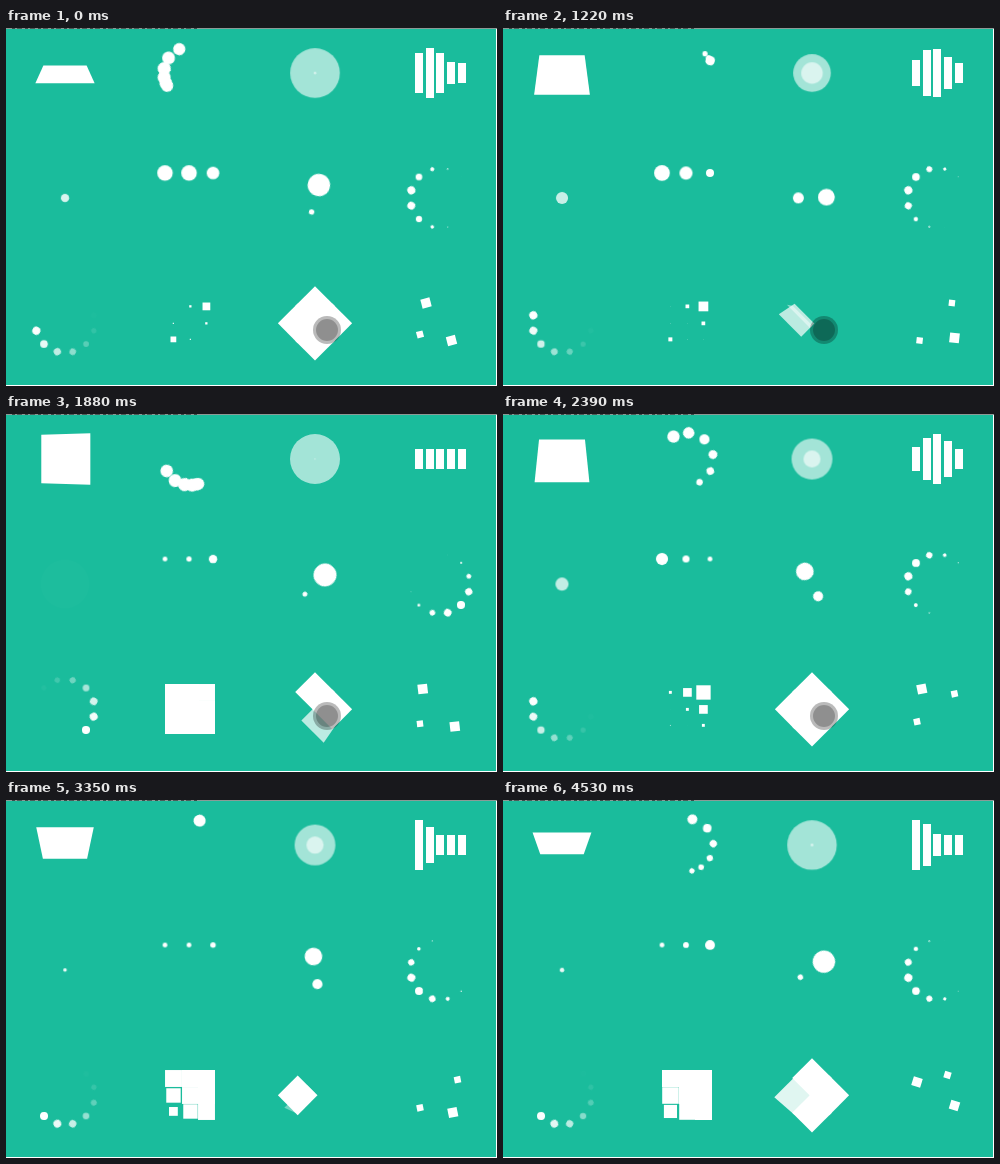
Animation of 491 by 358 pixels, one loop 4.55 s. Source, as an HTML page:

```html
<!DOCTYPE html>
<html lang="en">
<head>
<meta charset="utf-8">
<title>Loading spinners</title>
<style>
  html, body { margin: 0; width: 100%; height: 100%; overflow: hidden; background: #1abc9c; }
  * { animation-play-state: paused !important; }
  .spin { position: absolute; width: 50px; height: 50px; }
  i, b { display: block; position: absolute; }
  .chase b, .ring b, .fade b, .bounce i, .flow i, .swing i, .pulse { border-radius: 50%; }
  .plane, .pulse, .chase b, .ring b, .fade b, .fold b,
  .bounce i, .wave i, .flow i, .swing i, .grid i, .wander i { background: #fff; }

  .plane { animation: plane 1.2s ease-in-out infinite; }
  @keyframes plane {
    0% { transform: perspective(150px) rotateX(0deg) rotateY(0deg); }
    50% { transform: perspective(150px) rotateX(-180.1deg) rotateY(0deg); }
    100% { transform: perspective(150px) rotateX(-180deg) rotateY(-179.9deg); }
  }

  .chase { animation: chase-turn 2.5s linear infinite; }
  .chase i { inset: 0; animation: chase-dot 2s ease-in-out infinite; }
  .chase b { width: 25%; height: 25%; animation: chase-size 2s ease-in-out infinite; }
  .chase i, .chase b { animation-delay: calc(var(--n) * .1s - 1.1s); }
  @keyframes chase-turn { 100% { transform: rotate(360deg); } }
  @keyframes chase-dot { 80%, 100% { transform: rotate(360deg); } }
  @keyframes chase-size { 0%, 100% { transform: scale(1); } 50% { transform: scale(.4); } }

  .bounce i {
    inset: 0; opacity: .6; animation: bounce 2s cubic-bezier(.455, .03, .515, .955) infinite;
    animation-delay: calc(var(--n) * -1s);
  }
  @keyframes bounce { 0%, 100% { transform: scale(0); } 45%, 55% { transform: scale(1); } }

  .wave i {
    left: calc(var(--n) * 10.625px); width: 7.5px; height: 100%;
    animation: wave 1.2s ease-in-out infinite; animation-delay: calc(var(--n) * .1s - 1.2s);
  }
  @keyframes wave { 0%, 40%, 100% { transform: scaleY(.4); } 20% { transform: scaleY(1); } }

  .pulse { animation: pulse 1.2s cubic-bezier(.455, .03, .515, .955) infinite; }
  @keyframes pulse { 0% { transform: scale(0); } 100% { transform: scale(1); opacity: 0; } }

  .flow i {
    left: calc(var(--n) * 24px - 8px); top: -8px; width: 16px; height: 16px;
    animation: flow 1.4s cubic-bezier(.455, .03, .515, .955) infinite;
    animation-delay: calc(var(--n) * .15s - .3s);
  }
  @keyframes flow { 0%, 80%, 100% { transform: scale(.3); } 40% { transform: scale(1); } }

  .swing { animation: swing-turn 1.8s linear infinite; }
  .swing i {
    left: 13.75px; top: calc(var(--n) * 27.5px); width: 22.5px; height: 22.5px;
    animation: swing-size 2s ease-in-out infinite; animation-delay: calc(var(--n) * -1s);
  }
  @keyframes swing-turn { 100% { transform: rotate(360deg); } }
  @keyframes swing-size { 0%, 100% { transform: scale(.2); } 50% { transform: scale(1); } }

  .ring i, .fade i { inset: 0; transform: rotate(calc(var(--n) * 30deg + 30deg)); }
  .ring b, .fade b {
    width: 15%; height: 15%; animation: ring 1.2s ease-in-out infinite;
    animation-delay: calc(var(--n) * .1s - 1.1s);
  }
  .fade b { animation-name: fade; }
  @keyframes ring { 0%, 80%, 100% { transform: scale(0); } 40% { transform: scale(1); } }
  @keyframes fade {
    0%, 39%, 100% { opacity: 0; transform: scale(.6); }
    40% { opacity: 1; transform: scale(1); }
  }

  .grid { display: grid; grid-template: repeat(3, 1fr) / repeat(3, 1fr); }
  .grid i {
    position: static; animation: grid 1.3s ease-in-out infinite;
    animation-delay: calc(var(--diagonal) * .1s);
  }
  @keyframes grid { 0%, 70%, 100% { transform: scale(1); } 35% { transform: scale(0); } }

  .fold { transform: rotate(45deg); }
  .fold i {
    left: -1.25px; top: -1.25px; width: 27.5px; height: 27.5px;
    transform-origin: 26.25px 26.25px; transform: rotate(calc(var(--n) * 90deg));
  }
  .fold b {
    inset: 0; transform-origin: 100% 100%; animation: fold 2.4s linear infinite;
    animation-delay: calc(var(--n) * .3s);
  }
  @keyframes fold {
    0%, 10% { transform: perspective(192px) rotateX(-180deg); opacity: 0; }
    25%, 75% { transform: perspective(192px) rotateX(0deg); opacity: 1; }
    90%, 100% { transform: perspective(192px) rotateY(180deg); opacity: 0; }
  }

  .wander i {
    width: 20%; height: 20%; animation: wander 2s ease-in-out infinite;
    animation-delay: calc(var(--n) * -.5s);
  }
  @keyframes wander {
    0% { transform: translate(0, 0) rotate(0deg) scale(1); }
    25% { transform: translate(37.5px, 0) rotate(-90deg) scale(.6); }
    50% { transform: translate(37.5px, 37.5px) rotate(-180deg) scale(1); }
    75% { transform: translate(0, 37.5px) rotate(-270deg) scale(.6); }
    100% { transform: translate(0, 0) rotate(-360deg) scale(1); }
  }

  #pointer {
    position: absolute; left: -14px; top: -14px; width: 28px; height: 28px;
    border-radius: 50%; background: rgba(0, 0, 0, .27);
  }
  #pointer::after {
    content: ""; position: absolute; inset: 3px; border-radius: 50%; background: rgba(0, 0, 0, .23);
  }
  /* Slivers of the window around the page */
  #edge { position: absolute; inset: 0; border: solid #fff; border-width: 0 1px 1px 0; }
  #edge::before, #edge::after { content: ""; position: absolute; top: 0; height: 1px; }
  #edge::before { left: 0; right: -1px; background: #8b9a96; }
  #edge::after {
    left: 6px; width: 187px;
    background: repeating-linear-gradient(90deg, #3d4b48 0 3px, #8b9a96 3px 5px, #4d5b58 5px 10px, #8b9a96 10px 13px);
  }
</style>
</head>
<body>
<script>
  const spinners = [
    ['plane', 0], ['chase', 6], ['bounce', 2], ['wave', 5],
    ['pulse', 0], ['flow', 3], ['swing', 2], ['ring', 12],
    ['fade', 12], ['grid', 9], ['fold', 4], ['wander', 3],
  ];
  const part = (_, n) =>
    `<i style="--n:${n};--diagonal:${n % 3 + 2 - Math.floor(n / 3)}"><b></b></i>`;
  document.body.innerHTML = spinners.map(([name, count], k) => {
    const left = 34 + k % 4 * 125, top = 20 + Math.floor(k / 4) * 125;
    return `<div class="spin ${name}" style="left:${left}px;top:${top}px">`
      + Array.from({ length: count }, part).join('') + '</div>';
  }).join('') + '<div id="pointer"></div><div id="edge"></div>';

  const LOOP = 4550, START = 59139, RATE = 1.04, HEAD_START = 335;
  const early = new Set(['chase-turn', 'chase-dot', 'swing-turn']);
  const animations = document.getAnimations();
  const pointer = document.getElementById('pointer');

  // How long each pose is held, in hundredths of a second
  const holds = [13, 12, 15, 12, 15, 15, 12, 15, 13, 13, 12, 15, 13, 13, 15,
    ...Array(12).fill(12), 15, 12, 12, 15, 15, 12, 12, 13, 2];
  let sum = 0;
  const starts = holds.map(hold => (sum += hold) * 10 - hold * 10);
  const clamp = x => Math.max(0, Math.min(1, x));

  function pose(t) {
    for (const a of animations) {
      a.currentTime = START + RATE * t + (early.has(a.animationName) ? HEAD_START : 0);
    }
    const move = clamp((t - 2750) / 120);
    pointer.style.transform = `translate(${321 - 3 * move}px, ${302 - 10 * move}px)`;
    pointer.style.opacity = 1 - clamp((t - 2870) / 360);
  }

  let shown = -1;
  function tick(now) {
    const t = now % LOOP;
    const start = starts.findLast(s => s <= t);
    if (start !== shown) pose(shown = start);
    requestAnimationFrame(tick);
  }
  tick(0);
</script>
</body>
</html>
```
